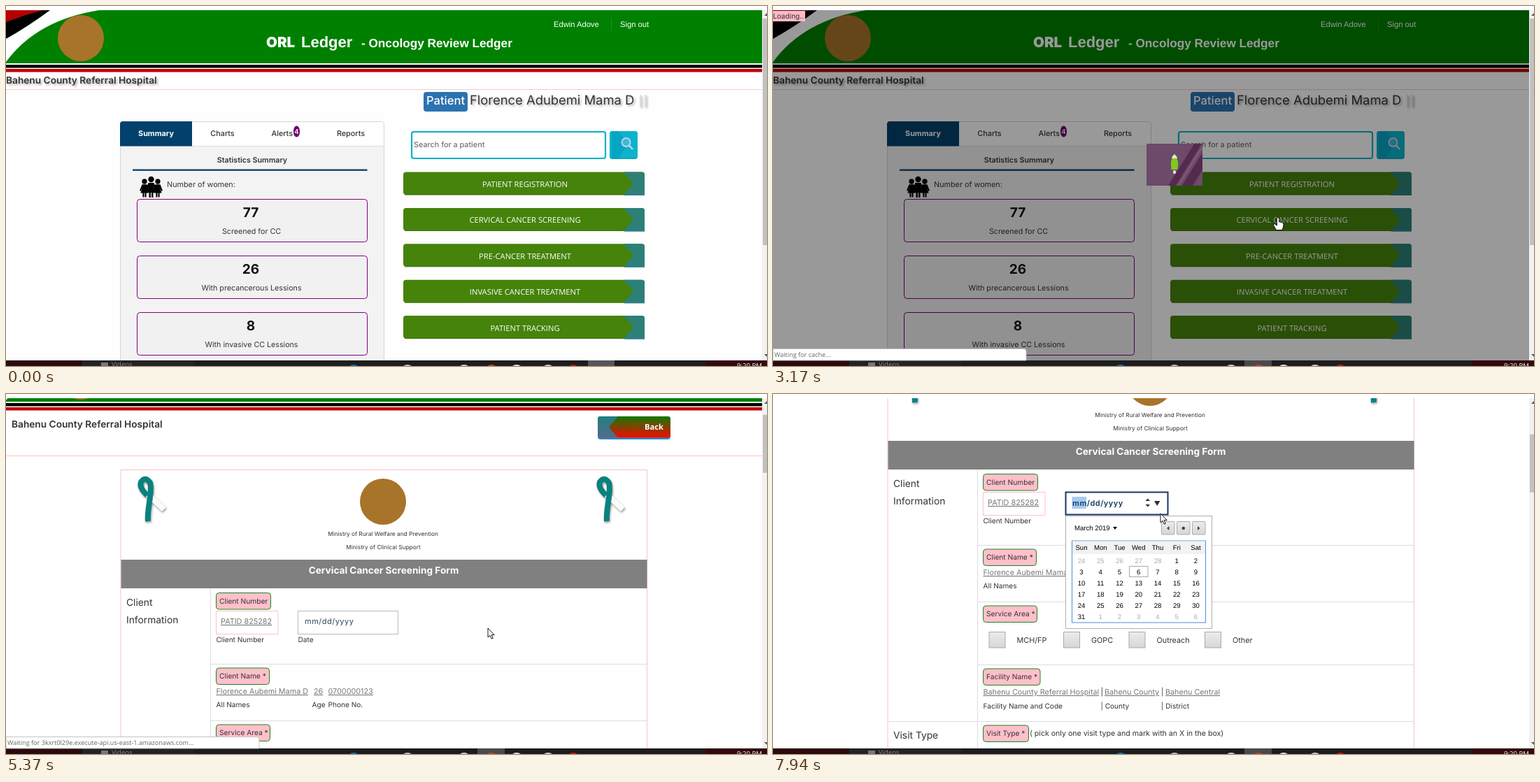
These frames come from a looping animation (1088x515 px, 8000 ms). An HTML page:

```html
<!DOCTYPE html>
<html lang="en">
<head>
<meta charset="utf-8">
<title>Patient tracking walkthrough</title>
<style>
html, body { margin: 0; width: 100%; height: 100%; overflow: hidden; background: #fff; }
svg { display: block; width: 100vw; height: 100vh; }
text { font-family: Inter, sans-serif; fill: #333; white-space: pre; text-rendering: geometricPrecision; }
.arial { font-family: "Liberation Sans", Arial, sans-serif; }
.open { font-family: "Open Sans", sans-serif; }
.mid { text-anchor: middle; }
.end { text-anchor: end; }
.w { fill: #fff; }
.b5 { font-weight: 500; }
.b6 { font-weight: 600; }
.b7 { font-weight: 700; }
.b9 { font-weight: 900; }
.link { fill: #777; text-decoration: underline; }
.date { fill: #2a4a5e; }
.shade { filter: drop-shadow(2px 2px 1.5px #aaa); }
.soft { filter: drop-shadow(1px 2px 1.5px #999); }
</style>
</head>
<body>
<svg id="stage" viewBox="0 0 1088 515" preserveAspectRatio="none"></svg>
<script>
const LOOP = 8000;
const HOSPITAL = 'Bahenu County Referral Hospital';

// drawing helpers
const text = (x, y, size, str, cls = '', more = '') =>
  `<text x="${x}" y="${y}" font-size="${size}" class="${cls}" ${more}>${str}</text>`;
const rect = (x, y, w, h, fill, more = '') =>
  `<rect x="${x}" y="${y}" width="${w}" height="${h}" fill="${fill}" ${more}/>`;
const path = (d, fill, more = '') => `<path d="${d}" fill="${fill}" ${more}/>`;
const disc = (x, y, r, fill) => `<circle cx="${x}" cy="${y}" r="${r}" fill="${fill}"/>`;
const group = (id, body, more = '') => `<g id="${id}" ${more}>${body}</g>`;
const line = (x1, y1, x2, y2, color, w = 1) =>
  `<path d="M${x1} ${y1}L${x2} ${y2}" stroke="${color}" stroke-width="${w}" fill="none"/>`;

function header(shift) {
  return rect(0, 6, 1081, 76, '#008000') +
    path('M0 6H133Q44 20 0 80Z', '#fff') +
    path('M0 6H63Q32 29 0 47Z', '#000') +
    path('M0 6H52Q26 13 0 23Z', '#b50000') +
    disc(107, 46, 33, '#a8742a') +
    rect(0, 84, 1081, 4.5, '#000') + rect(0, 90, 1081, 4.5, '#c00000') +
    text(783, 30, 11.2, 'Edwin Adove', 'arial w') +
    line(865.5, 17, 865.5, 35, '#1d8f1d') +
    text(878, 30, 11.2, 'Sign out', 'arial w') +
    text(372 + shift, 59 + shift, 20.5, 'ORL', 'b9 w') +
    text(422 + shift, 59 + shift, 22, 'Ledger', 'arial b7 w') +
    text(508 + shift, 59 + shift, 17.2, '- Oncology Review Ledger', 'arial b7 w');
}

const buttonTop = i => 237.5 + i * 51.4;

function menuButton(label, i) {
  const y = buttonTop(i);
  return rect(568, y, 345, 32.5, '#45830b', `rx="4" id="btn${i}"`) +
    path(`M883 ${y}H909Q913 ${y} 913 ${y + 4}V${y + 33.5}H883L897 ${y + 16}Z`, '#2c8078') +
    line(885, y + 33, 913, y + 33, '#3b7fa0') +
    line(570, y + 32.5, 884, y + 32.5, '#376a08') +
    text(742, y + 21.5, 11.2, label, 'open w mid');
}

function statBox(value, label, i) {
  const y = 276.5 + i * 81;
  return rect(187.5, y, 329, 61, '#f1f1f1', 'stroke="#800080" rx="4"') +
    text(350, y + 25, 19, value, 'b7 mid', 'style="fill:#111"') +
    text(351, y + 49, 10.7, label, 'mid');
}

function woman(x, y, k) {
  return `<g transform="translate(${x} ${y}) scale(${k})">` + disc(0, 0, 4.2, '#000') +
    path('M-4 5H4L8 15 6 16 3 10 6.5 19H3V26H.6V19H-.6V26H-3V19H-6.5L-3 10-6 16-8 15Z', '#000') + '</g>';
}

function home() {
  return rect(0, 6, 1081, 501, '#fefefe') + header(0) +
    text(0, 110.5, 13.7, HOSPITAL, 'b6 shade') +
    line(0, 119.5, 1081, 119.5, '#f5c9d2') +
    rect(597, 123, 63, 28, '#2b72b0', 'rx="4"') +
    text(628.5, 141, 16.6, 'Patient', 'b5 w mid') +
    text(663, 141, 18.4, 'Florence Adubemi Mama D', 'shade') +
    group('bars', rect(906, 127, 2, 17, '#ddd') + rect(913, 127, 2, 17, '#ddd'), 'class="shade"') +
    rect(163.5, 165.5, 377, 360, '#f3f3f3', 'stroke="#d5d5d5" rx="4"') +
    path('M164 200V170Q164 166 168 166H536Q540 166 540 170V200Z', '#fff') +
    line(164, 200.5, 540, 200.5, '#dcdcdc') +
    path('M163 200.5V169Q163 165 167 165H266V200.5Z', '#02416c') +
    text(214.5, 185.5, 10.8, 'Summary', 'b7 w mid') +
    text(309.5, 185.5, 10.8, 'Charts', 'b5 mid') +
    text(379.5, 185.5, 10.8, 'Alerts', 'b5') +
    '<ellipse cx="415.5" cy="179.5" rx="4.6" ry="8" fill="#700070"/>' +
    text(415.5, 183, 9.5, '4', 'b6 w mid') +
    text(493, 185.5, 10.8, 'Reports', 'b5 mid') +
    text(352, 224, 10.7, 'Statistics Summary', 'b6 mid') +
    rect(181, 233.5, 335.5, 2.3, '#0a3f66') +
    woman(198, 251, .87) + woman(217, 251, .87) + woman(207.5, 248, 1) +
    text(230, 258.5, 10.8, 'Number of women:') +
    [['77', 'Screened for CC'], ['26', 'With precancerous Lessions'], ['8', 'With invasive CC Lessions']]
      .map((s, i) => statBox(s[0], s[1], i)).join('') +
    rect(580, 180, 277, 38, '#fff', 'stroke="#08b0c8" stroke-width="2.2" rx="3"') +
    text(583, 202, 10.8, 'Search for a patient', 'b5', 'style="fill:#707070"') +
    rect(863, 179, 40, 40, '#0aa0bc', 'rx="4"') + rect(863, 179, 40, 38.5, '#0bb4cc', 'rx="4"') +
    path('M866 179H876L889 198 876 217.5H866Z', '#07a5c4') +
    `<circle cx="886.5" cy="195" r="6" fill="#3bb9d8" stroke="#c9d3ee" stroke-width="1.8"/>` +
    line(891, 199.5, 896, 205, '#c9d3ee', 2.6) +
    ['PATIENT REGISTRATION', 'CERVICAL CANCER SCREENING', 'PRE-CANCER TREATMENT',
      'INVASIVE CANCER TREATMENT', 'PATIENT TRACKING'].map(menuButton).join('');
}

const ribbon = x => `<g transform="translate(${x} 0)" fill="none" class="soft">` +
  '<path d="M200 212L226 236" stroke="#fbfbfb" stroke-width="8.5"/>' +
  '<path d="M203 253C201 236 210 212 206 198Q199 188 193 197Q190 205 202 216" stroke="#0a817f" stroke-width="8"/></g>';

const tag = (y, w, label, h = 24.5) =>
  rect(300.5, y + .5, w, h - 1, '#ffc0cb', 'stroke="#1c861c" rx="4"') +
  (label ? text(305, y + 15.5, 10.2, label) : '');

function checkbox(x, label, lx) {
  return rect(x, 581.5, 23, 22.5, 'url(#check)', 'stroke="#aaa"') + text(lx, 597, 10.8, label);
}

function back() {
  return rect(848, 103, 104, 33, '#2a8fc4', 'rx="4"') + rect(848, 103, 104, 30.5, 'url(#hot)', 'rx="4"') +
    path('M852 103H877L864 118.5 877 133.5H852Q848 133.5 848 129V107Q848 103 852 103Z', 'url(#cold)') +
    text(915, 122, 11.2, 'Back', 'open b7 w');
}

// the form before its web font arrives
function bareForm() {
  return tag(356, 76, '', 23) + tag(465, 73, '', 23) + text(366, 480, 9, '*') +
    rect(300.5, 381.5, 85.5, 33, '#fff', 'stroke="#ffc0cb"') +
    text(307.5, 402, 11.2, 'PATID 825282', 'arial link') +
    rect(415, 381.5, 135.5, 33, '#fff', 'stroke="#bbb"') +
    text(425, 402, 10.7, 'mm/dd/yyyy', 'open date') +
    text(432, 504, 11.2, 'Florence Aubemi Mama D', 'arial link end') +
    text(439, 504, 11.2, '26', 'arial link') + text(459, 504, 11.2, '0700000123', 'arial link');
}

function fullForm() {
  const place = (y, size, cls, items) => items.map(([x, s]) => text(x, y, size, s, cls)).join('');
  return text(8, 119, 13.7, HOSPITAL, 'b6') +
    text(539, 274, 8.3, 'Ministry of Rural Welfare and Prevention', 'mid') +
    text(539.5, 293, 8.3, 'Ministry of Clinical Support', 'mid') +
    text(540, 328, 13.6, 'Cervical Cancer Screening Form', 'b7 w mid') +
    place(374, 13.8, '', [[172, 'Client']]) + place(399, 13.8, '', [[172, 'Information']]) +
    place(734, 13.8, '', [[172, 'Visit Type']]) +
    tag(355, 78, 'Client Number') + tag(462.5, 76, 'Client Name *') + tag(543.5, 77, 'Service Area *') +
    tag(633.5, 81.5, 'Facility Name *') + tag(714.5, 65, 'Visit Type *') +
    rect(300.5, 381.5, 88.5, 33, '#fff', 'stroke="#ffc0cb"') +
    text(307, 400, 10.85, 'PATID 825282', 'link') +
    group('dateIdle', rect(417.5, 381.5, 143, 33, '#fff', 'stroke="#bbb"') +
      text(427, 400, 11, 'mm/dd/yyyy', 'date', 'letter-spacing=".5"')) +
    group('dateFocus', rect(418.5, 381.5, 146, 32, '#fff', 'stroke="#16365f" stroke-width="2"') +
      rect(427.5, 388, 20.5, 17, '#a6cbf3') +
      text(428, 400.5, 11, 'mm/dd/yyyy', 'b6', 'letter-spacing=".5" style="fill:#163a60"') +
      path('M532.5 394H539L535.7 390.5ZM532.5 399H539L535.7 402.5ZM545 394H553.5L549.2 401Z', '#2a2f3a')) +
    place(426, 10.1, '', [[300.5, 'Client Number'], [417.5, 'Date']]) +
    place(500, 10.8, 'link', [[300.5, 'Florence Aubemi Mama D'], [440, '26'], [460.5, '0700000123']]) +
    place(519, 10.1, '', [[300.5, 'All Names'], [437.5, 'Age'], [460.5, 'Phone No.']]) +
    checkbox(309, 'MCH/FP', 348.5) + checkbox(415.5, 'GOPC', 455) +
    checkbox(509, 'Outreach', 548.5) + checkbox(617.5, 'Other', 657) +
    place(671, 10.75, 'link', [[300.5, HOSPITAL], [474, 'Bahenu County'], [561, 'Bahenu Central']]) +
    place(671, 10.75, '', [[468.5, '|'], [555, '|']]) +
    place(691, 10.1, '', [[300.5, 'Facility Name and Code'], [468.5, '| County'], [555, '| District']]) +
    text(367, 730, 10.6, '( pick only one visit type and mark with an X in the box)');
}

function form() {
  return rect(0, 6, 1081, 800, '#fff') + header(8) + line(0, 159.5, 1081, 159.5, '#f5c2cd') +
    group('back', back()) +
    rect(164, 179.5, 752.5, 640, 'none', 'stroke="#f5c2cd"') +
    ribbon(0) + ribbon(656) + disc(539, 225, 33, '#a8742a') +
    rect(164.5, 308, 752, 41, '#808080') + line(292.5, 349, 292.5, 800, '#ddd') +
    [457.5, 538.5, 628.5].map(y => line(293, y, 916, y, '#ddd')).join('') +
    line(164, 709.5, 916, 709.5, '#ddd') +
    group('bare', bareForm()) + group('full', fullForm());
}

function calendar() {
  const col = i => 441 + i * 27.25;
  let s = rect(418.5, 174.5, 209, 161, '#fff', 'stroke="#b0b0b0"') +
    text(431, 195, 9.6, 'March 2019', 'arial', 'style="fill:#000"') + path('M486 190H492L489 194Z', '#000');
  [555, 577, 599].forEach(x => s += rect(x + .5, 182.5, 18.5, 18.5, 'url(#check)', 'stroke="#aaa" rx="1"'));
  s += path('M566.5 189V195L563 192ZM607 189V195L610.5 192Z', '#444') + disc(586.8, 192, 2.3, '#444') +
    rect(427.5, 210, 191, 117, '#fff', 'stroke="#4a90d9"') + rect(428, 210.5, 190, 18.5, '#f2f2f2') +
    rect(509.5, 246.5, 26.5, 15, '#fff', 'stroke="#aaa"');
  ['Sun', 'Mon', 'Tue', 'Wed', 'Thu', 'Fri', 'Sat'].forEach((d, i) =>
    s += text(col(i), 223, 9.6, d, 'arial mid', 'style="fill:#000"'));
  for (let i = 0; i < 42; i++) {
    const d = i - 4, out = d < 1 || d > 31;
    s += text(col(i % 7), 241.7 + 16 * Math.floor(i / 7), 9.6, d < 1 ? d + 28 : d > 31 ? d - 31 : d,
      'arial mid', `style="fill:${out ? '#aaa' : '#000'}"`);
  }
  return s;
}

function loader() {
  const stars = [[545, 206], [563, 246], [600, 208], [586, 250], [606, 244], [551, 238], [580, 204]]
    .map(([x, y]) => disc(x, y, .5, '#b58aa8')).join('');
  const planets = stars + disc(574, 226.5, 9.5, '#5fd0d6') +
    path('M568 221q4-4 8-2l2 4-5 2-2 4-4-2ZM577 228l5-1-1 5-4 2Z', '#e6e2b0') +
    group('moons', disc(557.5, 219, 4, '#f6d79a') + disc(591, 235, 2, '#b9c7c4'));
  const rocket = rect(534, 197, 80, 60, '#6d496a') +
    group('streaks', line(612, 190, 566, 264, '#532b4d', 9) + line(634, 190, 588, 264, '#532b4d', 13) +
      line(621, 190, 575, 264, '#84607f', 1.5)) +
    group('ship', path('M574 212Q581 220 578.5 234H569.5Q567 220 574 212Z', '#80c81e') +
      path('M574 212Q577 214 578 218H570Q571 214 574 212Z', '#d9efc0') +
      rect(572, 235, 4, 5, '#e8dbe6', 'rx="1.5"'));
  return rect(534, 197, 80, 60, '#522c4c', 'rx="3"') + group('sceneA', planets) + group('sceneB', rocket);
}

function taskbar() {
  const icons = [[497, '#1c6ea4'], [574, '#bbb'], [655, '#ccc'], [694, '#c8401c'], [730, '#ddd'], [775, '#ccc'], [811, '#c01818']];
  return rect(0, 507, 1088, 8, '#1d1d1f') + rect(0, 507, 109, 8, '#2b090d') + rect(1000, 507, 88, 8, '#33090f') +
    rect(109, 507, 160, 8, '#232325') + rect(136, 510, 10, 5, '#777') +
    text(151, 516, 9.5, 'Videos', 'open', 'style="fill:#888"') +
    rect(832, 507, 38, 8, '#55555b', 'id="litA"') + rect(674, 507, 39, 8, '#4a4a4e', 'id="litB"') +
    icons.map(([x, c]) => `<ellipse cx="${x}" cy="516" rx="6" ry="3" fill="${c}"/>`).join('') +
    text(1045, 518, 9.6, '9:20 PM', 'open w');
}

const gradient = (id, a, b) =>
  `<linearGradient id="${id}" x2="0" y2="1"><stop stop-color="${a}"/><stop offset="1" stop-color="${b}"/></linearGradient>`;

const stage = document.getElementById('stage');
stage.innerHTML = '<defs><clipPath id="page"><path d="M0 6H1081V507H0Z"/></clipPath>' +
  '<clipPath id="gif"><path d="M534 197H614V257H534Z"/></clipPath>' +
  gradient('hot', '#0f7a00', '#f50a00') + gradient('cold', '#1f8080', '#546a8c') + gradient('check', '#ececec', '#d6d6d6') + '</defs>' +
  rect(0, 0, 1088, 515, '#fff') +
  `<g clip-path="url(#page)">${group('home', home())}${group('form', form())}</g>` +
  group('popup', calendar()) +
  group('veil', rect(0, 6, 1081, 501, '#000', 'opacity=".4"') + rect(0, 7, 46, 15, '#ffb9c6') +
    text(0, 18, 10.1, 'Loading..') + `<g clip-path="url(#gif)">${loader()}</g>`) +
  rect(1081, 6, 7, 501, '#f1f1f1') + rect(1082, 18, 6, 324, '#c1c1c1', 'id="thumb"') +
  path('M1084 14H1088V10ZM1084 498H1088V502Z', '#555') +
  taskbar() +
  group('status', path('M0 490.5H359Q362 490.5 362 494V507H0Z', '#fff', 'stroke="#c4c4c4"') +
    text(2, 502, 9.1, '', 'open', 'id="statusText" style="fill:#666"')) +
  group('cursor',
    path('M0 0V13L3 10.3 5.2 15.2 7.3 14.3 5.1 9.6H9.2Z', '#fff', 'id="arrow" stroke="#000" stroke-width=".9"') +
    path('M-1.6 1.2a1.6 1.6 0 0 1 3.2 0V6L3 5.7 4.2 6.6 5.6 6.4 6.5 7.4 7.6 7.7 8 9.2 7.6 13 6 17.5H-2.5L-6 11.5-6.6 9.5-5 8.6-1.6 11Z',
      '#fff', 'id="hand" stroke="#000" stroke-width=".9"'));

const ui = {};
stage.querySelectorAll('[id]').forEach(el => ui[el.id] = el);
const show = (el, on) => el.style.display = on ? '' : 'none';
const ramp = (t, a, b) => Math.max(0, Math.min(1, (t - a) / (b - a)));

// runs of screen updates: start, end, count
const runs = [[140, 900, 11], [980, 1150, 3], [1300, 2100, 11], [2180, 2870, 10], [3020, 3020, 1],
  [3170, 3170, 1], [3950, 3950, 1], [4180, 4430, 4], [4590, 5370, 11], [5430, 6230, 11],
  [6310, 6920, 9], [7060, 7640, 9], [7940, 7940, 1]];
const pointer = [[140, 1005, 511], [900, 722, 303], [4430, 722, 303], [5370, 689, 335],
  [6230, 648, 289], [6920, 594, 170], [7640, 544, 152], [7940, 554, 171]];
const scrolls = [[4430, 0], [5370, 71], [6230, 223], [6920, 241]];
const statuses = [[0, ''], [1300, 'Waiting for col.eum-appdynamics.com...'], [3170, 'Waiting for cache...'],
  [4180, 'Establishing secure connection...'], [4590, 'Waiting for 3kxrt0l29e.execute-api.us-east-1.amazonaws.com...'],
  [5430, 'Waiting for a.intentmedia.net...'], [6500, '']];

function snap(t) {
  let at = 0;
  for (const [a, b, n] of runs) {
    if (t < a) break;
    const gap = n > 1 ? (b - a) / (n - 1) : 1;
    at = Math.min(b, a + gap * Math.floor((t - a) / gap + 1e-6));
  }
  return at;
}

function track(keys, t) {
  const i = keys.findIndex(k => k[0] > t);
  if (i === 0) return keys[0].slice(1);
  if (i < 0) return keys[keys.length - 1].slice(1);
  const p = keys[i - 1], q = keys[i], f = ramp(t, p[0], q[0]);
  return p.slice(1).map((v, j) => v + (q[j + 1] - v) * f);
}

function draw(now) {
  const t = snap(now);
  const onForm = t >= 3950, styled = t >= 4590, focus = t >= 7060;
  const [x, y] = track(pointer, t);
  const [scroll] = track(scrolls, t);

  show(ui.home, !onForm);
  show(ui.form, onForm);
  show(ui.bare, !styled);
  show(ui.full, styled);
  ui.form.setAttribute('transform', `translate(0 ${-scroll})`);
  ui.back.setAttribute('transform', `translate(${styled ? -2 : 0} 0)`);
  show(ui.dateIdle, !focus);
  show(ui.dateFocus, focus);
  show(ui.popup, t >= 7340);
  ui.thumb.setAttribute('y', 18 + scroll * .165);
  ui.thumb.setAttribute('height', onForm ? 83 : 324);

  let over = t >= 900 && !styled;
  for (let i = 0; i < 5; i++) {
    const top = buttonTop(i), inside = t >= 140 && x > 568 && x < 913 && y > top && y < top + 33;
    const dark = !inside ? 0 : i === 1 ? ramp(t, 820, 1150) * (1 - ramp(t, 1620, 2100)) : .5;
    if (inside && !onForm) over = true;
    ui['btn' + i].setAttribute('fill', `rgb(${69 - 20 * dark},${131 - 37 * dark},${11 - 6 * dark})`);
  }

  const veil = ramp(t, 1220, 1540) * (1 - ramp(t, 4100, 4430));
  show(ui.veil, veil > 0);
  ui.veil.setAttribute('opacity', veil);
  const late = t >= 2480, left = Math.min(0, t - 3020);
  show(ui.sceneA, !late);
  show(ui.sceneB, late);
  ui.moons.setAttribute('transform', `rotate(${(t - 1540) * .14} 574 226.5)`);
  ui.ship.setAttribute('transform', `translate(0 ${-left * .04})`);
  ui.streaks.setAttribute('transform', `translate(${-left * .08} ${left * .128})`);

  const msg = statuses.filter(s => s[0] <= t).pop()[1];
  show(ui.status, msg);
  if (ui.statusText.textContent !== msg) ui.statusText.textContent = msg;
  show(ui.litA, t < 140);
  show(ui.litB, t >= 140);

  show(ui.cursor, t >= 140);
  show(ui.arrow, !over);
  show(ui.hand, over);
  ui.cursor.setAttribute('transform', `translate(${x} ${y})`);
}

const begin = performance.now();
function tick() {
  draw((performance.now() - begin) % LOOP);
  requestAnimationFrame(tick);
}
tick();
</script>
</body>
</html>
```
